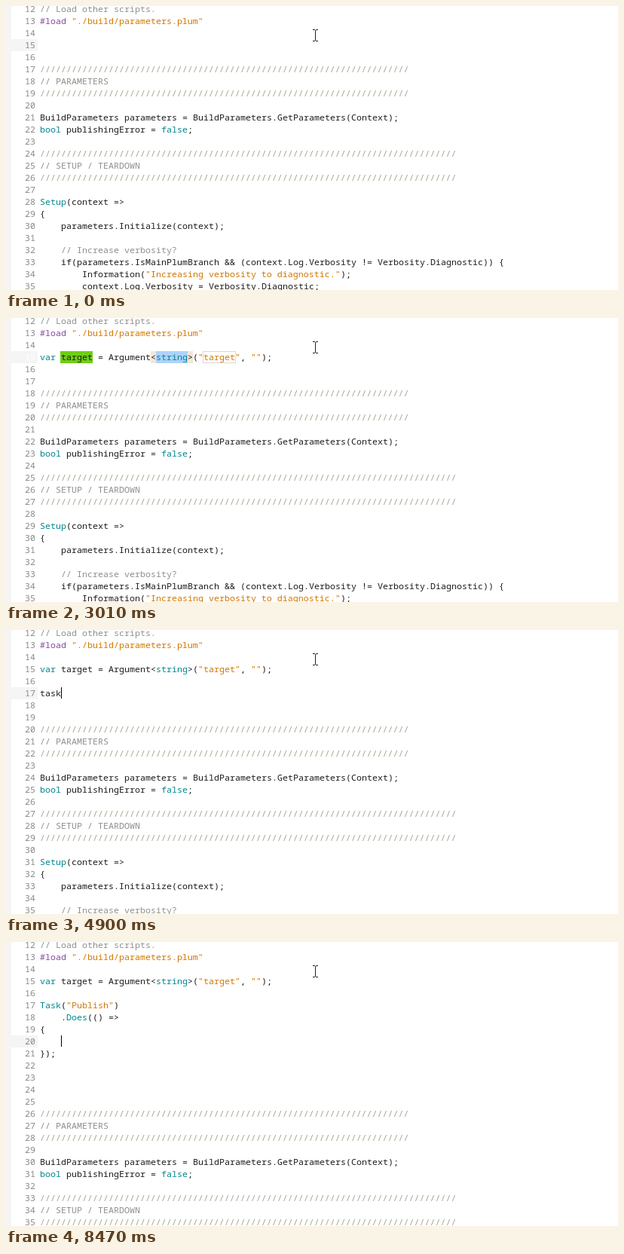
An HTML page with a canvas that plays this animation: 812 by 377 pixels, repeating every 8.54 s.

```html
<!DOCTYPE html>
<html lang="en">
<head>
<meta charset="utf-8">
<title>Code snippets</title>
<style>
  html, body { margin: 0; width: 100%; height: 100%; overflow: hidden; background: #fff; }
  canvas { display: block; }
</style>
</head>
<body>
<canvas id="stage" width="812" height="377"></canvas>
<script>
const ctx = document.getElementById('stage').getContext('2d');
const LOOP = 8540, CHAR = 7, ROW = 16, LEFT = 45, FIRST = 12, LAST = 35;
const COLOR = {
  text: '#1c1c1c', comment: '#8e908c', slashes: '#a2a691', string: '#d27600',
  keyword: '#00858f', directive: '#8a4a9e', number: '#8a8a8a', band: '#f5f5f5',
  green: '#6fcf12', typing: '#84e02c', select: '#aed2fb', bracket: '#f5e6d8'
};
const TOKEN = /(\/\/.*)|("[^"]*")|(#load)|\b(var|bool|false|string|Setup|Task|Does)\b|([^\s"\/#]+?(?=\b|["\s\/#]|$))/g;

const HEAD = ['// Load other scripts.', '#load "./build/parameters.plum"', ''];
const BODY = [
  '/'.repeat(70), '// PARAMETERS', '/'.repeat(70), '',
  'BuildParameters parameters = BuildParameters.GetParameters(Context);',
  'bool publishingError = false;', '',
  '/'.repeat(79), '// SETUP / TEARDOWN', '/'.repeat(79), '',
  'Setup(context =>', '{', '    parameters.Initialize(context);', '',
  '    // Increase verbosity?',
  '    if(parameters.IsMainPlumBranch && (context.Log.Verbosity != Verbosity.Diagnostic)) {',
  '        Information("Increasing verbosity to diagnostic.");',
  '        context.Log.Verbosity = Verbosity.Diagnostic;'
];

const colX = col => LEFT + col * CHAR;
const rowY = line => (line - FIRST) * ROW - 4;
const latest = (t, steps) => steps.filter(s => s[0] <= t).pop()[1];

function rect(color, x, y, w, h) {
  ctx.fillStyle = color;
  ctx.fillRect(x, y, w, h);
}

function mark(color, line, col, len, pad = 1) {
  rect(color, colX(col) - pad, rowY(line), len * CHAR + pad, ROW);
}

function frameWord(line, col, len, filled) {
  const x = colX(col), y = rowY(line), w = len * CHAR;
  if (filled) rect('#ececec', x, y, w, ROW);
  ctx.strokeStyle = filled ? '#b4b4b4' : '#dcd8d2';
  ctx.lineWidth = 1;
  ctx.strokeRect(x - 0.5, y + 0.5, w + 1, ROW - 1);
}

function drawCode(text, line) {
  for (const m of text.matchAll(TOKEN)) {
    const [word, comment, string, directive, keyword] = m;
    ctx.fillStyle = comment ? (/^\/+$/.test(word) ? COLOR.slashes : COLOR.comment)
      : string ? COLOR.string : directive ? COLOR.directive
      : keyword ? COLOR.keyword : COLOR.text;
    ctx.fillText(word, colX(m.index), rowY(line) + 12);
  }
}

// Everything that depends on time: typed lines, caret, current line, highlights.
function editor(t) {
  if (t < 840) {
    const typed = latest(t, [[0, ''], [350, 'a'], [490, 'ar'], [560, 'arg']]);
    return { lines: [typed, ''], row: 15, caret: typed ? typed.length : null };
  }
  const name = latest(t, [[840, 'name'], [2170, 't'], [2310, 'tar'], [2450, 'targ'],
    [2590, 'targe'], [2660, 'target']]);
  const argument = `var ${name} = Argument<string>("${name}", "");`;

  if (t < 3710) {
    const typing = t >= 2170 && t < 3010;
    return {
      lines: [argument, '', ''], row: 15, snippet: true,
      caret: typing ? 4 + name.length : null,
      marks() {
        const n = name.length;
        mark(COLOR.green, 15, 4, n);
        if (t < 2170) mark(COLOR.select, 15, 4, n, 0);
        mark(COLOR.bracket, 15, n + 15, 1, 0);
        mark(COLOR.bracket, 15, n + 22, 1, 0);
        if (t < 3010) mark(COLOR.green, 15, n + 16, 6);
        else mark(COLOR.select, 15, n + 16, 6, 0);
        frameWord(15, n + 25, n, t < 3010);
      }
    };
  }
  if (t < 4270) return { lines: [argument, '', ''], row: 15, caret: argument.length };
  if (t < 4410) return { lines: [argument, '', '', ''], row: 16, caret: 0 };
  if (t < 5320) {
    const typed = latest(t, [[4410, ''], [4620, 't'], [4760, 'tas'], [4900, 'task']]);
    return { lines: [argument, '', typed, '', ''], row: 17, caret: typed.length };
  }

  const task = latest(t, [[5320, 'build'], [6090, 'P'], [6300, 'Pu'], [6370, 'Pub'],
    [6510, 'Publi'], [6580, 'Publis'], [6720, 'Publish']]);
  const lines = [argument, '', `Task("${task}")`, '    .Does(() =>', '{', '', '});', '', '', '', ''];
  if (t < 7070) {
    return {
      lines, row: 17, snippet: true,
      caret: t < 6090 ? null : 6 + task.length,
      marks() {
        mark(COLOR.typing, 17, 6, task.length);
        if (t < 6090) mark(COLOR.select, 17, 6, task.length, 0);
      }
    };
  }
  return { lines, row: 20, caret: t >= 7770 && t < 8470 ? null : 4 };
}

function drawPointer() {
  const c = '#222';
  rect(c, 410, 32, 1, 14);
  for (const y of [31, 46]) {
    rect(c, 407, y, 3, 1);
    rect(c, 411, y, 3, 1);
  }
}

function draw(t) {
  const state = editor(t);
  rect('#fff', 0, 0, 812, 377);
  rect(COLOR.band, 0, 0, 7, 377);
  rect(COLOR.band, 7, rowY(state.row), 35, ROW);
  if (state.marks) state.marks();

  ctx.font = '11.667px "Noto Sans Mono", "DejaVu Sans Mono", monospace';
  ctx.textBaseline = 'alphabetic';
  const code = [...HEAD, ...state.lines, ...BODY];
  for (let line = FIRST; line <= LAST; line++) {
    ctx.fillStyle = state.snippet && line === state.row ? '#fff' : COLOR.number;
    ctx.fillText(line, 25, rowY(line) + 12);
    drawCode(code[line - FIRST] || '', line);
  }
  if (state.caret !== null) rect('#000', colX(state.caret), rowY(state.row), 1, 15);
  drawPointer();
}

const start = performance.now();
function tick() {
  draw((performance.now() - start) % LOOP);
  requestAnimationFrame(tick);
}
tick();
</script>
</body>
</html>
```
